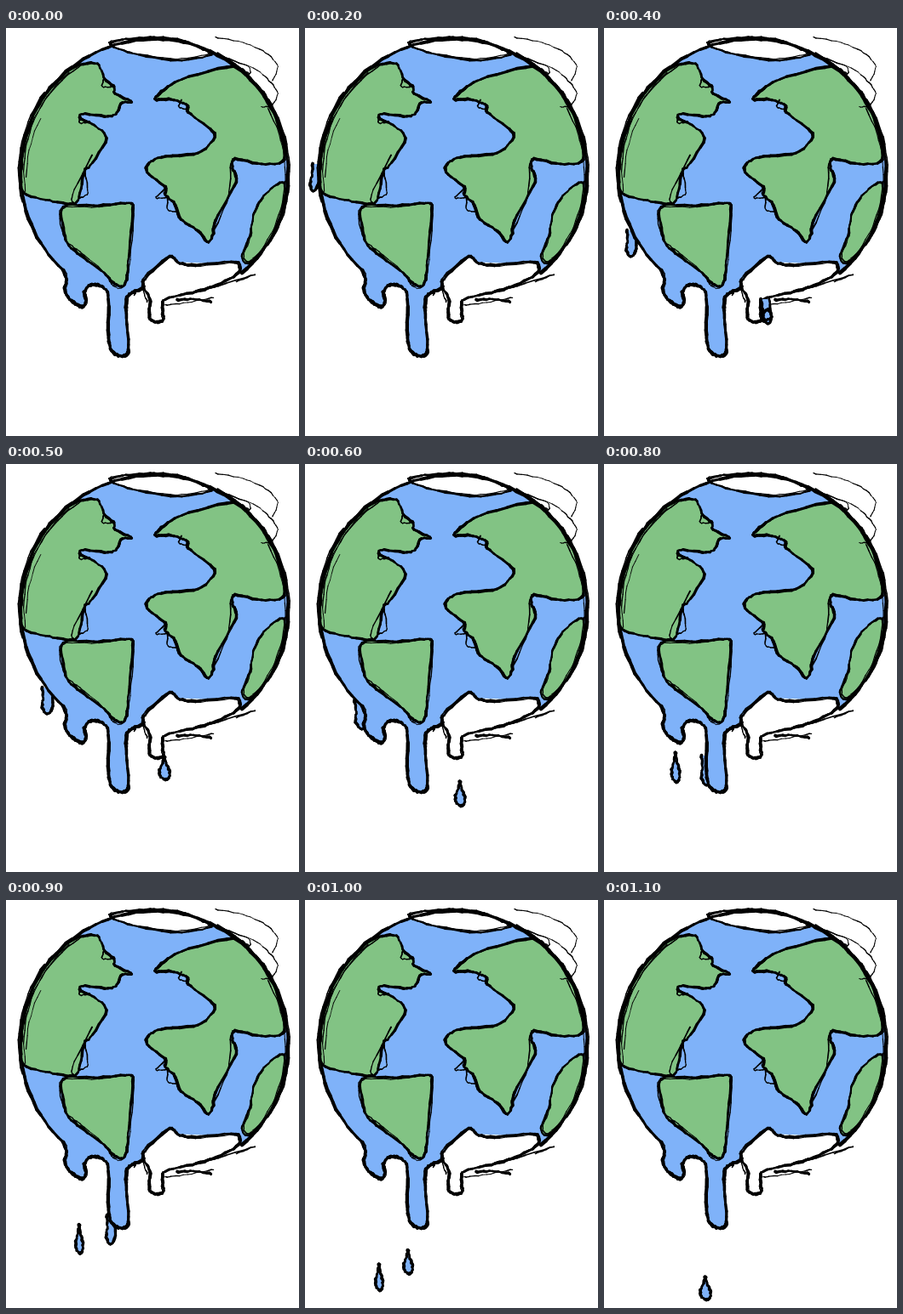
An HTML page with a canvas for the animation above (1200 ms loop, 344 by 480 pixels).

```html
<!DOCTYPE html>
<html lang="en">
<head>
<meta charset="utf-8">
<title>Melting globe</title>
<style>
html, body { margin: 0; width: 100%; height: 100%; overflow: hidden; background: #fff; }
canvas { display: block; }
</style>
</head>
<body>
<canvas id="stage" width="344" height="480"></canvas>
<script>
const ctx = document.getElementById('stage').getContext('2d');
const BLUE = '#7fb2f9', GREEN = '#82c384', WHITE = '#fff', INK = '#000';
const CX = 174, CY = 170, R = 157;
const LOOP = 1200, STEP = 100;

// Catmull-Rom curve through the points, with a low tension for a hand-drawn feel
function smooth(pts, closed) {
  const n = pts.length, out = [], k = 0.4;
  const at = i => closed ? pts[(i + n) % n] : pts[Math.max(0, Math.min(n - 1, i))];
  for (let i = 0; i < (closed ? n : n - 1); i++) {
    const a = at(i - 1), b = at(i), c = at(i + 1), d = at(i + 2);
    for (let j = 0; j < 6; j++) {
      const u = j / 6, u2 = u * u, u3 = u2 * u;
      out.push([0, 1].map(q =>
        (2 * u3 - 3 * u2 + 1) * b[q] + (u3 - 2 * u2 + u) * k * (c[q] - a[q]) +
        (3 * u2 - 2 * u3) * c[q] + (u3 - u2) * k * (d[q] - b[q])));
    }
  }
  out.push(at(closed ? 0 : n - 1));
  return out;
}

function trace(list, closed) {
  const pts = [];
  for (let i = 0; i < list.length; i += 2) pts.push([list[i], list[i + 1]]);
  return smooth(pts, closed);
}
const open = (...list) => trace(list, false);
const loop = (...list) => trace(list, true);

function fill(line, color) {
  ctx.fillStyle = color;
  ctx.beginPath();
  line.forEach(p => ctx.lineTo(p[0], p[1]));
  ctx.fill();
}

// Brush line whose width and position wobble a little
function brush(line, width, seed = 1) {
  ctx.strokeStyle = INK;
  ctx.lineCap = ctx.lineJoin = 'round';
  const wob = line.map((p, i) => [
    p[0] + 0.45 * Math.sin(i * 1.7 + seed * 3),
    p[1] + 0.45 * Math.sin(i * 2.3 + seed * 5)
  ]);
  for (let i = 1; i < wob.length; i++) {
    ctx.lineWidth = width * (1 + 0.18 * Math.sin(i * 0.53 + seed) + 0.1 * Math.sin(i * 1.9));
    ctx.beginPath();
    ctx.moveTo(...wob[i - 1]);
    ctx.lineTo(...wob[i]);
    ctx.stroke();
  }
}

// Thin second pass that drifts around a line
function loose(line, amp, seed) {
  brush(line.map(([x, y], i) => [
    x + amp * Math.sin(i * 0.21 + seed),
    y + amp * Math.cos(i * 0.17 + seed * 2)
  ]), 1.2, seed);
}

function arc(from, to, r, dy = 0) {
  const pts = [], n = Math.ceil(Math.abs(to - from) / 3);
  for (let i = 0; i <= n; i++) {
    const a = (from + (to - from) * i / n) * Math.PI / 180;
    pts.push([CX + r * Math.cos(a), CY + dy + r * Math.sin(a)]);
  }
  return pts;
}

const rim = arc(49, -227, R);
const drips = open(
  67, 285, 71, 297, 69, 308, 75, 319, 89, 328, 94, 321, 92, 311, 98, 303,
  110, 303, 120, 314, 120, 361, 123, 378, 131, 385, 139, 386, 144, 378,
  141, 336, 142, 317, 149, 311, 160, 307);
const body = [...rim, ...drips, [190, 275], [272, 278]];

const west = loop(
  21, 194, 18, 166, 22, 131, 35, 96, 55, 66, 82, 45, 107, 42, 116, 60,
  127, 69, 128, 77, 148, 87, 136, 88, 130, 100, 120, 104, 90, 101,
  88, 107, 103, 114, 118, 130, 99, 162, 92, 168, 86, 198, 79, 207, 51, 203);
const south = loop(
  67, 210, 109, 209, 144, 206, 149, 214, 144, 269, 142, 294, 137, 304,
  126, 300, 115, 288, 87, 267, 73, 255, 68, 239);
const east = loop(
  175, 84, 185, 73, 207, 60, 267, 45, 287, 60, 304, 79, 317, 103, 327, 154,
  300, 160, 269, 154, 266, 165, 270, 181, 246, 226, 243, 243, 237, 252,
  226, 239, 205, 225, 198, 207, 187, 196, 187, 187, 166, 170, 167, 160,
  182, 152, 226, 147, 245, 129, 240, 119, 214, 99, 213, 91, 194, 84);
const isle = loop(
  327, 183, 315, 186, 301, 200, 291, 219, 286, 245, 277, 269, 284, 277,
  300, 264, 315, 243, 326, 213);
const arctic = loop(
  122, 19, 141, 13, 174, 11, 206, 14, 232, 25, 240, 32, 200, 38, 149, 30);
const antarctic = loop(
  161, 304, 165, 293, 192, 269, 202, 276, 222, 279, 270, 275, 273, 288,
  249, 302, 224, 310, 187, 319, 184, 331, 185, 343, 177, 346, 168, 341, 169, 319);

// Small pointed flick off a coast: start, tip, end
const flick = (...p) => brush(open(...p), 1.5);

function globe() {
  fill(body, BLUE);
  [west, south, east, isle].forEach(land => fill(land, GREEN));
  fill(arctic, WHITE);
  fill(antarctic, WHITE);

  brush(rim, 3.7, 1);
  brush(drips, 3.6, 2);
  brush(west, 2.9, 3);
  brush(south, 3, 4);
  brush(east, 3.1, 5);
  brush(isle, 2.4, 6);
  brush(arctic, 2.5, 7);
  brush(antarctic, 3.2, 8);

  loose(south, 2.2, 3);
  loose(isle, 2.4, 2);
  loose(arctic, 1.8, 5);
  loose(antarctic, 1.7, 4);
  loose(drips, 1.6, 1);
  loose(east, 1, 6);

  // Repeated strokes along the rim
  brush(arc(165, 238, 156, 4), 1.3, 2);
  brush(arc(171, 229, 153, -2), 1.2, 4);
  brush(arc(167, 216, 159, -1), 1.8, 5);
  brush(arc(180, 207, 150, 5), 1, 8);
  brush(arc(-62, 26, 159), 1.7, 6);
  brush(arc(-30, 42, 154, 2), 1.2, 7);

  // Stray loops at the upper right
  brush(open(235, 27, 290, 47, 309, 62, 319, 77, 312, 91, 300, 93), 1.2);
  brush(open(246, 11, 278, 17, 305, 29, 319, 45, 313, 62), 1.1);
  brush(open(252, 34, 284, 45, 286, 54, 277, 47), 1.1);

  flick(115, 60, 113, 69, 126, 69);
  flick(86, 104, 87, 112, 99, 110);
  flick(101, 150, 78, 196, 80, 207);
  flick(93, 171, 96, 194, 87, 200);
  flick(206, 85, 203, 93, 214, 96);
  flick(186, 190, 176, 200, 191, 199);
  flick(190, 198, 190, 214, 202, 216);
  flick(264, 160, 261, 199, 244, 239);
  flick(144, 313, 152, 308, 151, 314);
  flick(163, 304, 162, 312, 166, 322);

  // Shade below the ice
  brush(open(187, 326, 213, 323, 244, 317), 1.2);
  brush(open(201, 320, 220, 319, 241, 322), 3);
  brush(open(244, 305, 292, 290, 271, 298), 1.5);
}

// Blue drip whose top stays open where it joins the globe
function hang(x, y, w, h, lean = 0) {
  const line = smooth([
    [-0.5, 0], [-0.42, 0.4], [-0.5, 0.75], [-0.1, 1], [0.4, 0.8], [0.5, 0]
  ].map(([a, b]) => [x + a * w + lean * b, y + b * h]));
  fill(line, BLUE);
  brush(line, 3);
}

// Free drop centred on a point
function bead(x, y, w, h) {
  const shape = smooth([
    [0, -0.5], [0.17, -0.2], [0.47, 0.12], [0.42, 0.4], [0.08, 0.49],
    [-0.36, 0.36], [-0.45, 0.08], [-0.16, -0.22]
  ].map(([a, b]) => [x + a * (w - 3), y + b * (h - 3)]), true);
  fill(shape, BLUE);
  brush(shape, 3, 2);
}

// What shows beneath the globe at each step
const behind = {
  1: () => hang(18, 104, 10, 32, -3),
  2: () => hang(14, 160, 10, 32, -4),
  3: () => hang(22, 208, 10, 26),
  4: () => hang(33, 238, 12, 31, -1),
  5: () => {
    hang(49, 263, 13, 31);
    bead(186, 358, 16, 30);
  },
  6: () => {
    hang(66, 278, 16, 34, 2);
    bead(182, 388, 15, 32);
  },
  7: () => {
    hang(117, 306, 15, 44);
    bead(182, 435, 15, 36);
  },
  8: () => {
    bead(84, 357, 13, 38);
    hang(121, 343, 13, 35);
  },
  9: () => {
    bead(86, 399, 12, 37);
    hang(124, 371, 11, 34, -1);
  },
  10: () => {
    bead(87, 444, 12, 34);
    bead(121, 426, 14, 31);
  },
  11: () => bead(119, 457, 16, 30)
};

// What shows on top of it
const front = {
  3: () => hang(190, 319, 8, 15),
  4: () => {
    hang(189, 319, 10, 29, 4);
    brush(open(185, 339, 192, 331, 197, 340, 187, 345), 3.2, 4);
  },
  7: () => hang(82, 310, 20, 29, -3)
};

let shown = -1;
function tick() {
  const step = Math.floor(performance.now() % LOOP / STEP);
  if (step !== shown) {
    shown = step;
    fill([[0, 0], [344, 0], [344, 480], [0, 480]], WHITE);
    behind[step]?.();
    globe();
    front[step]?.();
  }
  requestAnimationFrame(tick);
}
tick();
</script>
</body>
</html>
```
